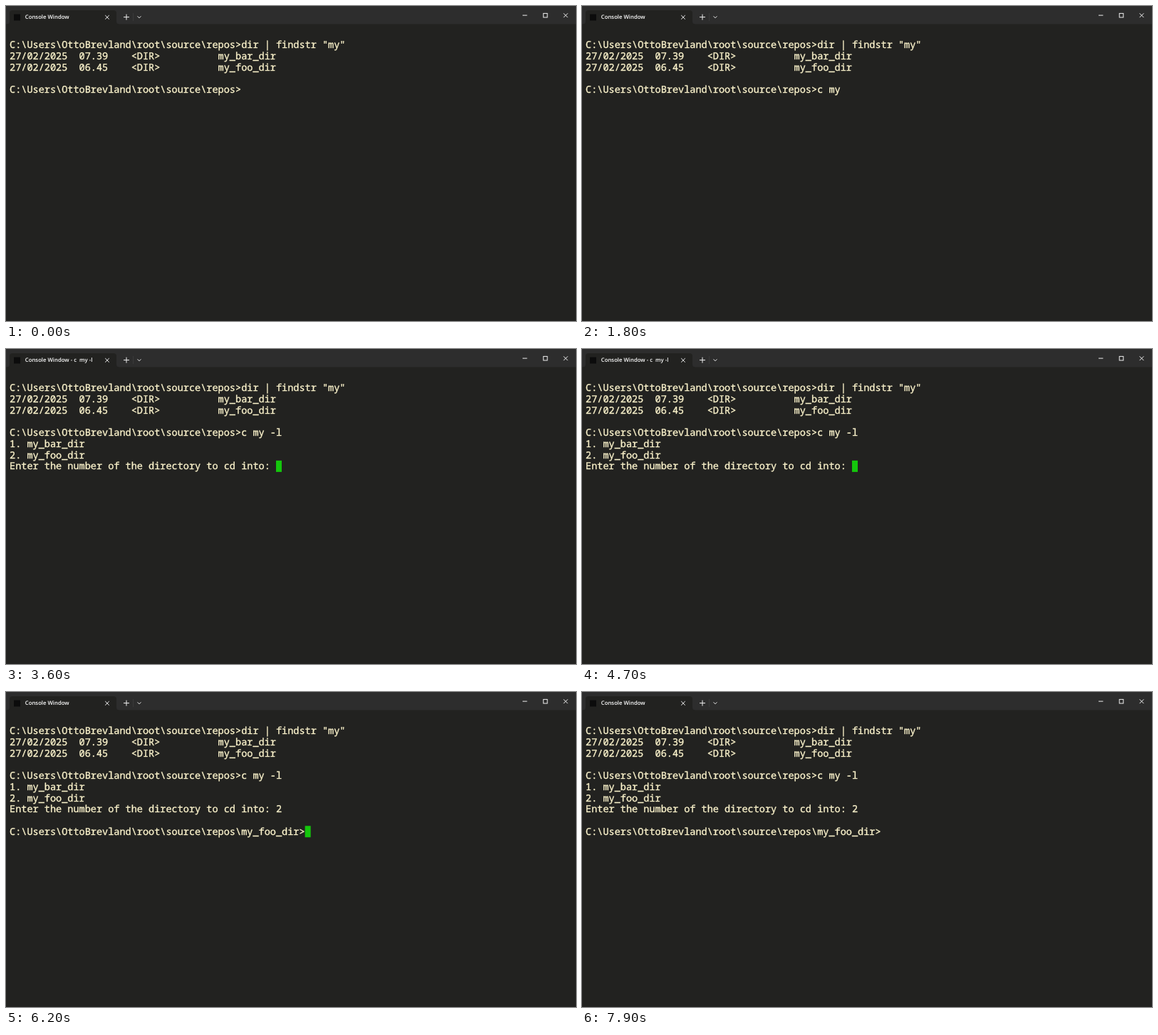
An HTML page for the animation above (8000 ms loop, 800 by 443 pixels).

```html
<!DOCTYPE html>
<html lang="en">
<head>
<meta charset="utf-8">
<title>Terminal</title>
<style>
  :root { --w: 8.13px; --h: 15.7px; --loop: 8s step-end infinite; }
  html, body { margin: 0; width: 100%; height: 100%; overflow: hidden; background: #222220; }
  #stage {
    position: relative; width: 800px; height: 443px; overflow: hidden;
    background: #222220; text-rendering: geometricPrecision;
  }
  #bar { position: absolute; left: 0; top: 0; }
  #tab {
    position: absolute; left: 26.8px; top: 11px; height: 10px;
    font: 600 7.75px/10px "Open Sans", "Noto Sans", sans-serif;
    color: #fff; white-space: pre;
  }
  #tab span { animation: prompting var(--loop); }

  #screen {
    position: absolute; left: 5px; top: 47.4px;
    font: 500 13.55px/var(--h) "Noto Sans Mono", "DejaVu Sans Mono", monospace;
    color: #fcf4cc; -webkit-text-stroke: .35px #fcf4cc; white-space: pre;
  }
  .row { position: absolute; left: 0; top: calc(var(--r) * var(--h)); height: var(--h); }
  #cmd {
    left: calc(40 * var(--w)); width: 0; overflow: hidden;
    animation: type var(--loop);
  }
  .list { animation: listed var(--loop); }
  .pick { left: calc(46 * var(--w)); animation: picked var(--loop); }
  .done { animation: finished var(--loop); }
  #cursor {
    position: absolute; left: 0; top: -.6px; width: 8.4px; height: 15.9px;
    background: #14c60c;
    animation: place var(--loop), blink var(--loop);
  }

  /* 1.25% is 100 ms */
  @keyframes type {
    0% { width: 0; }
    8.75% { width: calc(1 * var(--w)); }
    11.25% { width: calc(2 * var(--w)); }
    13.75% { width: calc(3 * var(--w)); }
    15% { width: calc(4 * var(--w)); }
    25% { width: calc(5 * var(--w)); }
    27.5% { width: calc(6 * var(--w)); }
    28.75% { width: calc(7 * var(--w)); }
    31.25%, 100% { width: calc(8 * var(--w)); }
  }
  @keyframes place {
    0% { transform: translate(calc(40 * var(--w)), calc(4 * var(--h))); }
    8.75% { transform: translate(calc(41 * var(--w)), calc(4 * var(--h))); }
    11.25% { transform: translate(calc(42 * var(--w)), calc(4 * var(--h))); }
    13.75% { transform: translate(calc(43 * var(--w)), calc(4 * var(--h))); }
    15% { transform: translate(calc(44 * var(--w)), calc(4 * var(--h))); }
    25% { transform: translate(calc(45 * var(--w)), calc(4 * var(--h))); }
    27.5% { transform: translate(calc(46 * var(--w)), calc(4 * var(--h))); }
    28.75% { transform: translate(calc(47 * var(--w)), calc(4 * var(--h))); }
    31.25% { transform: translate(calc(48 * var(--w)), calc(4 * var(--h))); }
    33.75% { transform: translate(calc(46 * var(--w)), calc(7 * var(--h))); }
    67.5% { transform: translate(calc(47 * var(--w)), calc(7 * var(--h))); }
    77.5%, 100% { transform: translate(calc(51 * var(--w)), calc(9 * var(--h))); }
  }
  @keyframes blink {
    0%, 21.25%, 38.75%, 51.25%, 65%, 73.75%, 83.75%, 97.5%, 100% { opacity: 0; }
    3.75%, 25%, 43.75%, 57.5%, 67.5%, 77.5%, 91.25% { opacity: 1; }
  }
  @keyframes prompting {
    0%, 77.5%, 100% { opacity: 0; }
    33.75% { opacity: 1; }
  }
  @keyframes listed { 0% { opacity: 0; } 33.75%, 100% { opacity: 1; } }
  @keyframes picked { 0% { opacity: 0; } 67.5%, 100% { opacity: 1; } }
  @keyframes finished { 0% { opacity: 0; } 77.5%, 100% { opacity: 1; } }
</style>
</head>
<body>
<div id="stage">
  <svg id="bar" width="800" height="26" fill="none" stroke="#f0f0f0" stroke-width="1">
    <path d="M0 0H800V25.5H0Z" fill="#2d2d2d" stroke="none"/>
    <path d="M1 25.5Q5 25.5 5 21.5V10Q5 6 9 6H151Q155 6 155 10V21.5Q155 25.5 159 25.5V26H1Z" fill="#222220" stroke="none"/>
    <path d="M11 11.5H20V20.5H11Z" fill="#0c0c0c" stroke="none"/>
    <path d="M139.2 13L144.8 18.6M144.8 13L139.2 18.6"/>
    <path d="M165 15.6H173M169 11.6V19.6"/>
    <path d="M178.5 10V21" stroke="#3a3a3a"/>
    <path d="M184.6 14.4L187 16.8L189.4 14.4"/>
    <path d="M725 13.1H731.4"/>
    <rect x="754.2" y="10.4" width="5.6" height="5.6"/>
    <path d="M782.6 10.3L788.4 16.1M788.4 10.3L782.6 16.1"/>
  </svg>
  <div id="tab">Console Window<span> - c  my -l</span></div>

  <div id="screen">
    <div id="cursor"></div>
    <div class="row" style="--r:0">C:\Users\OttoBrevland\root\source\repos&gt;dir | findstr "my"</div>
    <div class="row" style="--r:1">27/02/2025  07.39    &lt;DIR&gt;          my_bar_dir</div>
    <div class="row" style="--r:2">27/02/2025  06.45    &lt;DIR&gt;          my_foo_dir</div>
    <div class="row" style="--r:4">C:\Users\OttoBrevland\root\source\repos&gt;</div>
    <div class="row" style="--r:4" id="cmd">c my -l </div>
    <div class="row list" style="--r:5">1. my_bar_dir</div>
    <div class="row list" style="--r:6">2. my_foo_dir</div>
    <div class="row list" style="--r:7">Enter the number of the directory to cd into: </div>
    <div class="row pick" style="--r:7">2</div>
    <div class="row done" style="--r:9">C:\Users\OttoBrevland\root\source\repos\my_foo_dir&gt;</div>
  </div>
</div>
</body>
</html>
```
